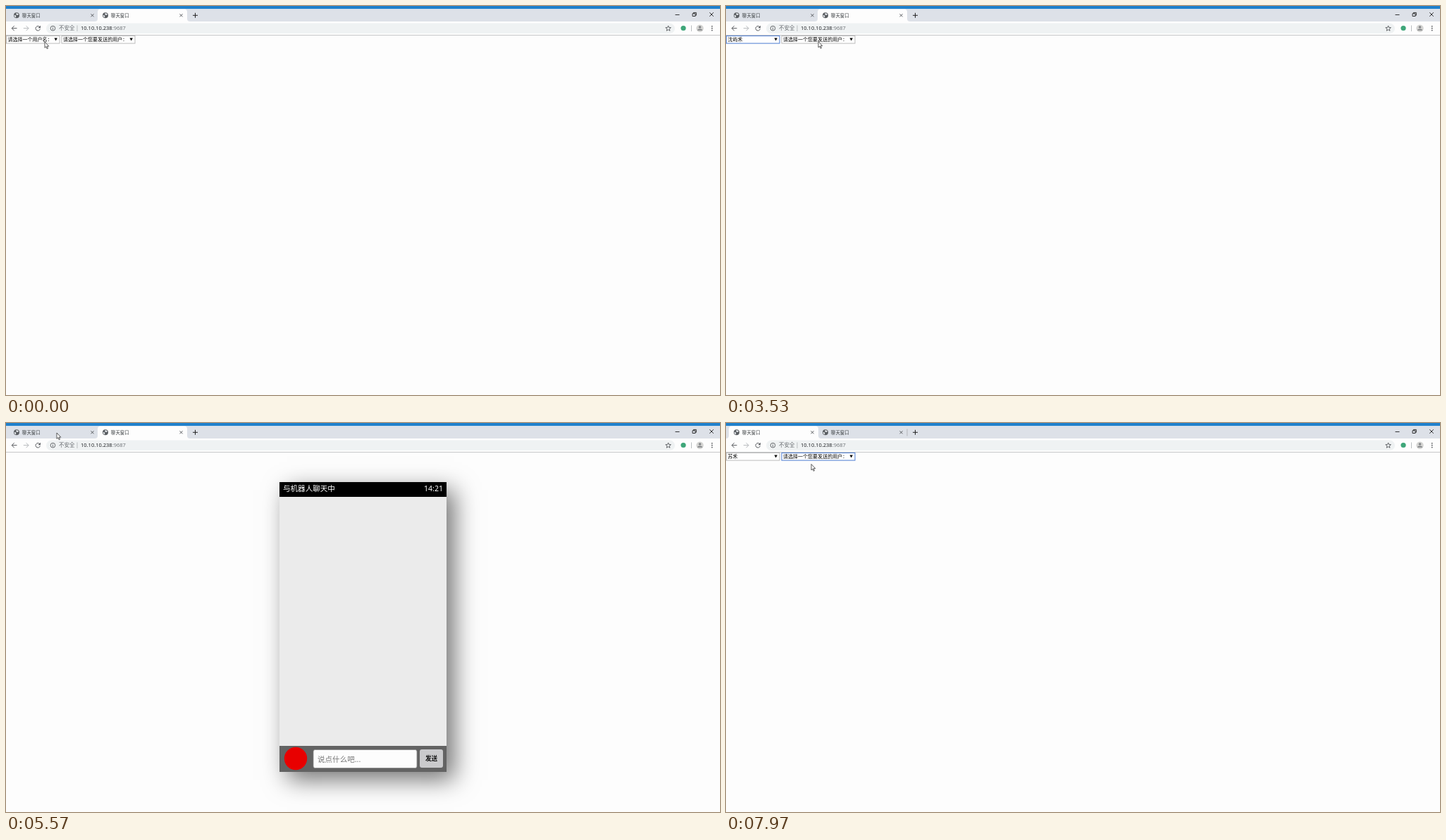
An HTML page for the animation above (8000 ms loop, 1013 by 553 pixels).

```html
<!DOCTYPE html>
<html>
<head>
<meta charset="utf-8">
<title>聊天窗口</title>
<style>
  html, body { margin: 0; width: 100%; height: 100%; overflow: hidden; background: #fdfdfd; }
  svg { display: block; position: absolute; left: 0; top: 0; }
  text { font-family: "Noto Sans", "Noto Sans CJK SC", "Noto Sans CJK", sans-serif; }
  .line { fill: none; stroke: #55585c; }
  .thin { stroke-width: .9; }
  .dark { stroke: #222; }
  .pale { stroke: #b4b7bb; }
  .tab { font-size: 6.4px; fill: #3c4043; }
  .bar { font-size: 7.5px; }
  .pick { font-size: 7.03px; font-weight: 500; fill: #000; }
  .chat { font-size: 10.56px; }
  .box { fill: #fff; stroke: #b4b4b4; stroke-width: .9; }
  .box.focus { stroke: #5b87d6; stroke-width: 1.1; }
  #page { position: absolute; left: 0; top: 42px; width: 1013px; height: 511px; overflow: hidden; }
  #shade { position: absolute; left: 388px; top: 42px; width: 237px; height: 412px;
    box-shadow: 10.5px 10.5px 32px rgba(0, 0, 0, .55); }
</style>
</head>
<body>
<div id="page"><div id="shade"></div></div>
<svg width="1013" height="553" viewBox="0 0 1013 553">
  <defs>
    <g id="label">
      <circle cx="15" cy="13.3" r="4" fill="#5a5e62"/>
      <path transform="translate(15 13.3)" d="M-3.2-.6C-1.8-.4-.6.2-.7 1.2L-1.2 3.2C-2.6 2.6-3.4 1-3.2-.6ZM-.6-2.9C.8-3.4 2.4-2.6 3-1.2L1.4-.2C.6-.6-.2-.6-.6-1.4Z" fill="#e3e6ea"/>
      <text class="tab" x="23" y="15.7">聊天窗口</text>
      <path class="line" d="M120.5 11.3 124.5 15.3M124.5 11.3 120.5 15.3"/>
    </g>
    <path id="down" d="M-2.2-1.9H2.2L0 2Z"/>
    <circle id="dot" r=".9" fill="#505357"/>
  </defs>

  <rect width="1013" height="4.3" fill="#1f80cc"/>
  <rect y="4.3" width="1013" height="17.7" fill="#dde1e8"/>
  <path id="active" d="M-4 22Q0 22 0 18V8.5Q0 4.5 4 4.5H123Q127 4.5 127 8.5V18Q127 22 131 22Z" fill="#fdfdfd"/>
  <path id="split" class="line pale" d="M257 8.5V18.5"/>
  <use href="#label"/>
  <use href="#label" x="126"/>
  <path class="line dark" d="M265 13.3H272M268.5 9.8V16.8"/>
  <path class="line thin dark" d="M949.5 12.5H955.5M998.2 9.2 1003.8 14.8M1003.8 9.2 998.2 14.8M974 10.8H978V14.5H974ZM975.3 10.8V9.4H979.3V13.2H978"/>

  <rect y="22" width="1013" height="19.5" fill="#fdfdfd"/>
  <rect y="41" width="1013" height="1" fill="#c6c7c9"/>
  <rect id="pill" x="57" y="24.5" width="892" height="14.6" rx="7.3"/>
  <path class="line" d="M15.5 31.7H8.4M11.7 28.2 8.2 31.7 11.7 35.2M47.6 29.6A3.2 3.2 0 1 0 48.4 32.5"/>
  <path class="line pale" d="M24.8 31.7H31.9M28.6 28.2 32.1 31.7 28.6 35.2"/>
  <path d="M49 27.8V31.2H45.5Z" fill="#55585c"/>
  <circle class="line thin" cx="66.5" cy="31.7" r="3.3"/>
  <path class="line thin" d="M66.5 31.2V33.7M66.5 29.6V30.4"/>
  <text class="bar" x="75" y="34.4" fill="#696d71">不安全</text>
  <path class="line thin pale" d="M101 27.5V36M972.5 27.5V36"/>
  <text class="bar" x="106" y="34.4" fill="#25282b">10.10.10.238<tspan fill="#75797d">:9687</tspan></text>
  <path id="star" class="line thin"/>
  <circle cx="961" cy="31.5" r="3.6" fill="#3ea679"/>
  <circle cx="984.5" cy="31.7" r="5.2" fill="#d5d5d3"/>
  <circle cx="984.5" cy="30" r="1.8" fill="#85878a"/>
  <path d="M981 34.8Q981 32.5 984.5 32.5T988 34.8Z" fill="#85878a"/>
  <use href="#dot" x="1001.7" y="28.8"/>
  <use href="#dot" x="1001.7" y="31.7"/>
  <use href="#dot" x="1001.7" y="34.6"/>

  <g id="picks">
    <rect id="box1" class="box" x=".5" y="42.5" width="75.5" height="10.6"/>
    <text id="user" class="pick" x="2.5" y="50.4"></text>
    <use href="#down" x="70.7" y="47.5"/>
    <rect id="box2" class="box" x="79" y="42.5" width="104" height="10.6"/>
    <text class="pick" x="81" y="50.4">请选择一个您要发送的用户：</text>
    <use href="#down" x="177.7" y="47.5"/>
  </g>

  <g id="room">
    <rect x="388" y="84" width="237" height="412" fill="#ebebeb"/>
    <rect x="388" y="84" width="237" height="21"/>
    <g class="chat" fill="#fff" font-weight="500">
      <text x="393" y="97.4">与机器人聊天中</text>
      <text x="620" y="97.4" text-anchor="end">14:21</text>
    </g>
    <rect x="388" y="459" width="237" height="37" fill="#636363"/>
    <circle cx="411" cy="477" r="16.2" fill="#e80000"/>
    <rect x="436" y="464.5" width="147" height="26" rx="2.5" fill="#fdfdfd" stroke="#8a8a8a" stroke-width=".8"/>
    <text class="chat" x="442" y="481.6" fill="#777">说点什么吧...</text>
    <rect x="587" y="464" width="33" height="26" rx="3" fill="#cacacc"/>
    <text x="603.5" y="480" font-size="8.6" font-weight="700" text-anchor="middle" fill="#111">发送</text>
  </g>

  <path id="arrow" d="M0 0V8.4L1.9 6.7 3.2 9.8 4.5 9.2 3.2 6.2H5.8Z" fill="#fff" stroke="#333" stroke-width=".8"/>
  <path id="beam" class="line thin dark" d="M-1.7-4H-.4L0-3.6.4-4H1.7M0-3.6V3.6M-1.7 4H-.4L0 3.6.4 4H1.7"/>
</svg>
<script>
const $ = id => document.getElementById(id);
const LOOP = 8000;
const ASK = "请选择一个用户名：";
const first = { x: 55, y: 51, tab: 2, user: ASK, focus: 0, open: false };

// Each move leaves at `from`, right after a click if one is given, and rests at x, y.
const moves = [
  { from: 30, to: 400, x: 46, y: 30 },
  { from: 560, to: 930, x: 55, y: 46 },
  { from: 1230, to: 1260, x: 282, y: 461 },
  { from: 1800, to: 2230, x: 76, y: 89 },
  { from: 2300, to: 2520, x: 55, y: 48 },
  { from: 2660, to: 2950, x: 47, y: 72, click: { focus: 1 } },
  { from: 3120, to: 3530, x: 131, y: 50.5, click: { user: "沈屿禾" } },
  { from: 3950, to: 4600, x: 104.5, y: 85.5, click: { focus: 2 } },
  { from: 4830, to: 5140, x: 136, y: 35, click: { open: true } },
  { from: 5170, to: 5560, x: 72, y: 14 },
  { from: 5720, to: 6200, x: 54.5, y: 49.5, click: { tab: 1, user: ASK, focus: 0, open: false } },
  { from: 6570, to: 6800, x: 50, y: 94, click: { focus: 1 } },
  { from: 7240, to: 7470, x: 122, y: 48, click: { user: "苏禾" } },
  { from: 7670, to: 7970, x: 121, y: 58.5, click: { focus: 2 } }
];

const ease = k => k * k * (3 - 2 * k);
const show = (id, on) => { $(id).style.display = on ? "" : "none"; };

function stateAt(t) {
  const s = { ...first };
  for (const { from, to, x, y, click } of moves) {
    if (t < from) break;
    const k = ease(Math.min(1, (t - from) / (to - from)));
    s.x += (x - s.x) * k;
    s.y += (y - s.y) * k;
    Object.assign(s, click);
  }
  return s;
}

function draw(t) {
  const { x, y, tab, user, focus, open } = stateAt(t);
  $("active").setAttribute("transform", `translate(${126 * tab - 122} 0)`);
  show("split", tab === 1);
  show("picks", !open);
  show("room", open);
  show("shade", open);
  $("user").textContent = user;
  $("box1").classList.toggle("focus", focus === 1);
  $("box2").classList.toggle("focus", focus === 2);

  const overBar = x > 62 && x < 949 && y > 24.5 && y < 39;
  $("pill").setAttribute("fill", overBar ? "#e7e9ea" : "#eff2f3");
  show("arrow", !overBar);
  show("beam", overBar);
  $(overBar ? "beam" : "arrow").setAttribute("transform", `translate(${x} ${y})`);
}

const star = Array.from({ length: 10 }, (_, i) => {
  const a = i * Math.PI / 5 - Math.PI / 2, r = i % 2 ? 1.7 : 4;
  return `${939.6 + r * Math.cos(a)} ${32 + r * Math.sin(a)}`;
});
$("star").setAttribute("d", "M" + star.join("L") + "Z");

const start = performance.now();
function tick() {
  draw((performance.now() - start) % LOOP);
  requestAnimationFrame(tick);
}
draw(0);
requestAnimationFrame(tick);
</script>
</body>
</html>
```
